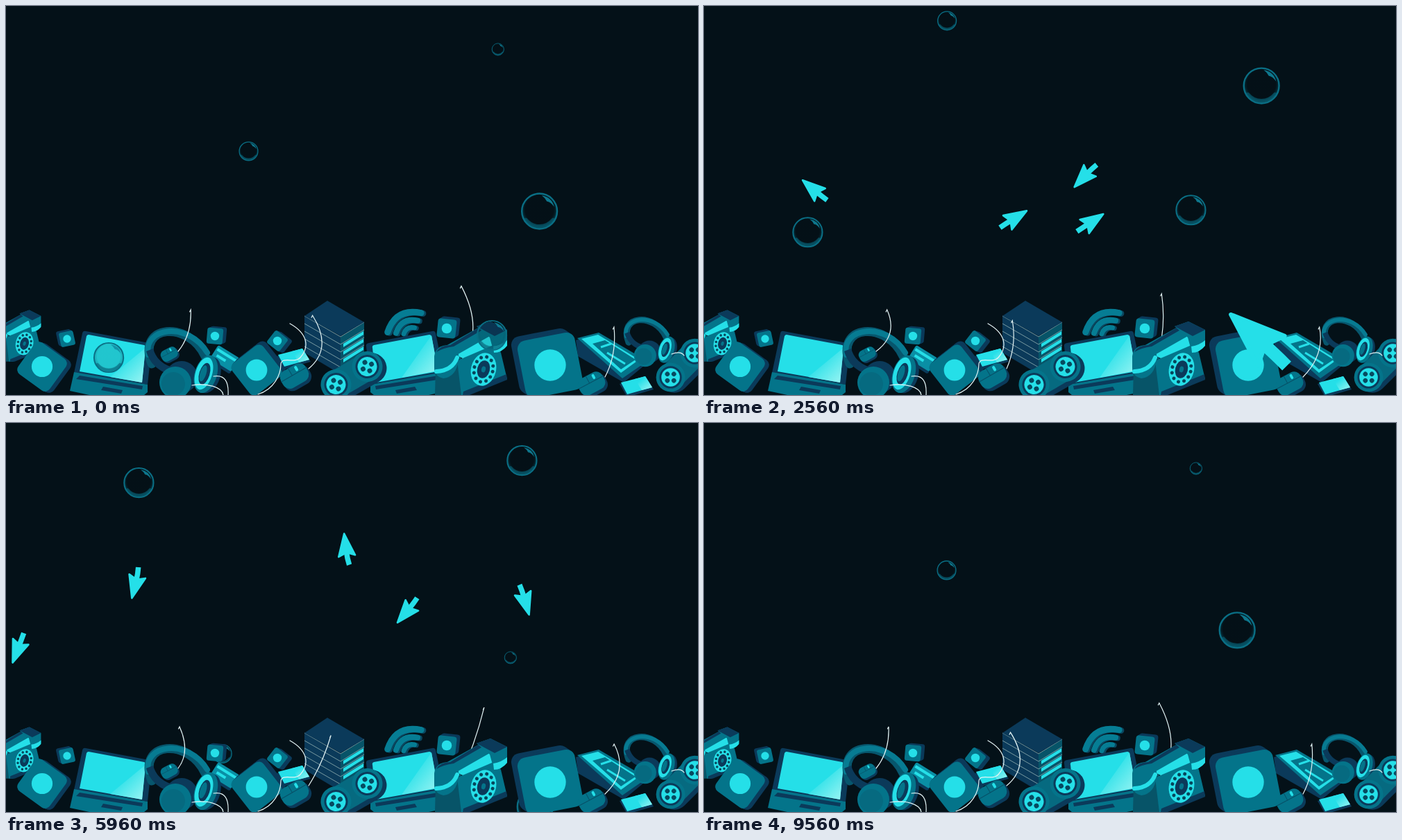
An HTML page for the animation above (9600 ms loop, 997 by 561 pixels).

```html
<!DOCTYPE html>
<html lang="en">
<head>
<meta charset="utf-8">
<title>Sea of devices</title>
<style>
html, body { margin: 0; width: 100%; height: 100%; overflow: hidden; background: #041118; }
svg { display: block; width: 100%; height: 100%; }
.n { fill: #0b3a5a; }
.t { fill: #04748a; }
.k { fill: #075468; }
.m { fill: #0a8fa5; }
.c { fill: #25dfe8; }
.line { fill: none; stroke-linecap: round; }
.wire { fill: none; stroke: #e4f4f5; stroke-width: 1.2; stroke-linecap: round; }
</style>
</head>
<body>
<svg viewBox="0 0 997 561">
<defs>
  <linearGradient id="glow" x1="0" y1="0" x2="1" y2="1">
    <stop offset=".3" stop-color="#25dfe8"/><stop offset="1" stop-color="#9df5f3"/>
  </linearGradient>
  <radialGradient id="film" cx=".5" cy=".45" r=".55">
    <stop offset=".72" stop-color="#020a10" stop-opacity=".12"/>
    <stop offset=".86" stop-color="#08596c" stop-opacity=".35"/>
    <stop offset="1" stop-color="#0b7a90" stop-opacity=".95"/>
  </radialGradient>
  <g id="bubble">
    <circle r="48" fill="url(#film)" stroke="#0a6f85" stroke-width="4.5"/>
    <path d="M6 -43Q34 -38 40 -12Q30 -26 20 -27Q16 -36 6 -43Z" fill="#108aa2" opacity=".85"/>
    <path d="M-37 22Q-22 40 0 40T37 22" class="line" stroke="#08647a" stroke-width="8" opacity=".6"/>
  </g>
  <g id="laptop">
    <path class="n" d="M115 469L206 486Q211 487 210 491L204 546L98 529L110 472Q111 468 115 469Z"/>
    <path class="c" d="M119 474L199 489Q202 490 201 493L196 543L106 527L116 476Q117 474 119 474Z"/>
    <path class="t" d="M98 528L204 546V557L199 561H120L92 555Z"/>
    <path class="n" d="M106 533L197 548L196 553L101 538Z"/>
    <path class="n" d="M140 549L168 554L166 559L137 554Z"/>
  </g>
  <g id="phone">
    <path class="k" d="M619 520L655 503L666 561H618Z"/>
    <path class="t" d="M650 512L704 484L713 500L722 538L664 561H656Z"/>
    <path class="n" d="M659 556L721 531L722 539L668 561H658Z"/>
    <path class="c" d="M646 502L700 474L707 487L658 508Z"/>
    <path class="t" d="M632 491L684 462L704 472L648 504Z"/>
    <path class="t" d="M617 505Q619 489 638 489Q654 491 652 510Q649 535 630 537Q617 534 617 522Z"/>
    <path class="n" d="M620 499Q626 489 640 489L684 462L690 465L645 491Q630 493 620 499Z"/>
    <path class="line" d="M620 527Q643 526 650 507" stroke="#25dfe8" stroke-width="6"/>
    <path class="t" d="M678 462L698 455L722 467V488L703 500L697 478Z"/>
    <path class="n" d="M678 462L698 455L722 467L704 476Z"/>
    <path class="c" d="M702 491Q714 489 722 482V490Q714 500 703 500Z"/>
    <g transform="translate(688 524) rotate(14)">
      <ellipse rx="18" ry="24" class="c"/>
      <ellipse rx="13.5" ry="18.5" class="line" stroke="#06465c" stroke-width="5" stroke-dasharray="0 8.4"/>
      <ellipse rx="9" ry="13" class="n"/>
      <ellipse rx="3" ry="4.5" class="t"/>
    </g>
  </g>
  <g id="headset">
    <path class="line" d="M210 516C188 458 264 454 287 505" stroke="#07566d" stroke-width="13"/>
    <path class="line" d="M205 503C197 463 262 454 290 500" stroke="#077b92" stroke-width="8"/>
    <path class="n" d="M202 498L212 494Q218 515 240 521L231 530Q208 520 202 498Z"/>
    <circle class="n" cx="253" cy="535" r="23"/>
    <circle class="t" cx="244" cy="543" r="23"/>
    <circle cx="241" cy="545" r="17" fill="#066a80"/>
    <g transform="translate(285 530) rotate(17)">
      <ellipse class="n" cx="7" rx="17" ry="27"/>
      <ellipse class="t" cx="3" rx="16" ry="28"/>
      <ellipse class="c" rx="12" ry="24"/>
      <ellipse class="n" cx="1" rx="7.5" ry="16"/>
      <ellipse class="t" cx="-1" rx="4.5" ry="12"/>
    </g>
  </g>
  <g id="mouse">
    <rect class="n" x="-20" y="-12" width="42" height="29" rx="12"/>
    <rect class="t" x="-21" y="-16" width="41" height="28" rx="11"/>
    <path d="M-3 -16V-4M-21 -4H20" class="line" stroke="#075067"/>
    <rect class="c" x="5" y="-14" width="4" height="8" rx="2"/>
  </g>
  <g id="knob">
    <circle class="t" r="22"/>
    <circle class="n" r="17"/>
    <circle class="c" r="14"/>
    <path d="M0 -7V-7M7 0H7M0 7V7M-7 0H-7" class="line" stroke="#064a60" stroke-width="7"/>
  </g>
  <g id="gamepad">
    <path class="line" d="M-23 5H30" stroke="#0b3a5a" stroke-width="44"/>
    <path class="line" d="M-26 0H26" stroke="#066a80" stroke-width="40"/>
    <use href="#knob" x="-26"/><use href="#knob" x="26"/>
  </g>
  <g id="slate">
    <path class="n" d="M-24 -3L14 -13L25 5L-13 16Z"/>
    <path class="c" d="M-22 -5L13 -14L23 2L-13 12Z"/>
    <path d="M-2 -10L13 -14L23 2L8 6Z" fill="url(#glow)"/>
  </g>
</defs>
<g id="far"></g>
<g id="back"></g>
<g id="front"></g>
<g id="near"></g>
</svg>
<script>
const LOOP = 9600, NS = 'http://www.w3.org/2000/svg';
const $ = id => document.getElementById(id);

function add(parent, tag, attrs = {}) {
  const el = document.createElementNS(NS, tag);
  for (const k in attrs) el.setAttribute(k, attrs[k]);
  return parent.appendChild(el);
}
const use = (id, transform = '') => `<use href="#${id}" transform="${transform}"/>`;
const poly = (cls, pts) => `<polygon class="${cls}" points="${pts}"/>`;

// App tile: extruded rounded square with a plain disc
function tile(x, y, size, turn, dx, dy) {
  const face = (cls, k) => `<rect class="${cls}" x="${-size / 2}" y="${-size / 2}" width="${size}" height="${size}"
    rx="${size * .15}" transform="translate(${x + dx * k} ${y + dy * k}) rotate(${turn})"/>`;
  return [1, .75, .5, .25].map(k => face('n', k)).join('') + face('t', 0) +
    `<circle class="c" cx="${x}" cy="${y}" r="${size * .27}"/>`;
}

function server() {
  let s = poly('n', '430,447 482,477 482,531 430,500') + poly('k', '482,477 516,456 516,512 482,531');
  for (let y = 0; y < 50; y += 11) {
    if (y) s += poly('c', `486,${476 + y} 515,${458 + y} 515,${463 + y} 486,${481 + y}`);
    s += `<path d="M430 ${447 + y}L482 ${477 + y}L516 ${456 + y}" fill="none" stroke="#7799a0"/>`;
  }
  return s + poly('n', '463,425 516,456 482,476 430,447');
}

function wifi() {
  const arc = (r, color, shift) => `<path class="line" stroke="${color}" stroke-width="${6 + r / 10}"
    d="M${-r * .9} ${-r * .65}Q0 ${-r * 1.45} ${r * .9} ${-r * .65}" transform="translate(${shift} ${shift})"/>`;
  const arcs = [10, 20, 31].map(r => arc(r, '#0a4760', 2) + arc(r, '#067d94', 0));
  return `<g transform="translate(584 474) rotate(-30)">${arcs.join('')}</g>`;
}

const card = `<g transform="translate(314 508) rotate(32)"><rect class="n" x="-17" y="-9" width="36" height="24" rx="3"/>
  <rect class="m" x="-17" y="-12" width="36" height="23" rx="3"/><path d="M-15 -6H17M-11 2H4" stroke="#25dfe8" stroke-width="4"/></g>`;

const tablet = poly('n', '821,482 853,472 925,514 890,543 824,505') +
  poly('t', '823,479 854,471 924,512 888,537') + poly('c', '829,480 853,474 912,510 886,529') +
  poly('t', '845,487 863,482 907,510 886,524') +
  '<path d="M857 492L872 487M866 500L892 516" stroke="#25dfe8" stroke-width="3"/>';

const wire = (id, scale = 1) => add($(id), 'path', { class: 'wire', 'stroke-width': scale });

$('back').innerHTML = server() + wifi();
const phoneWire = wire('back');
$('front').innerHTML =
  use('phone', 'translate(-455 120) scale(.7)') +
  tile(52, 520, 56, 36, 6, 2) + tile(88, 480, 21, -12, -4, -2) +
  use('laptop') + '<path d="M201 493L196 543L150 535Z" fill="url(#glow)"/>' +
  card + use('headset') + use('mouse', 'translate(236 503) rotate(-28) scale(.6)') +
  tile(301, 476, 23, 5, 5, -2) + tile(361, 525, 57, -38, 5, -5) + tile(391, 483, 23, 38, 6, 2) +
  use('slate', 'translate(414 508)') + use('mouse', 'translate(417 535) rotate(-30)') +
  use('laptop', 'translate(729 0) scale(-1 1)') +
  '<path d="M613 475L622 526L570 536Z" fill="url(#glow)"/>' +
  use('gamepad', 'translate(498 533) rotate(-30)') +
  tile(635, 465, 27, 6, 5, -3) + tablet + use('phone') + tile(784, 518, 84, -11, -9, -6) +
  use('mouse', 'translate(845 546) rotate(-28) scale(.95)') +
  use('headset', 'translate(750 124) scale(.7)') + use('slate', 'translate(908 548)') +
  use('gamepad', 'translate(975 518) rotate(-45) scale(.95)') +
  `<path class="wire" d="M409 458C434 472 438 491 424 507C416 516 398 505 396 516C396 532 386 553 363 560"/>
   <path class="wire" d="M268 547C290 543 312 550 313 561M299 534C316 531 321 543 320 561"/>
   <path class="wire" d="M959 502Q972 497 977 504"/>`;

const leftWire = wire('front'), midWire = wire('front'), rightWire = wire('front');

// Cosine that peaks at a given time, with whole cycles per loop
const wave = (t, peak, cycles = 1) => Math.cos((t - peak) / LOOP * cycles * 2 * Math.PI);

function bow(el, tip, tipY, mid, midY, root, rootY) {
  const cx = 2 * mid - (tip + root) / 2, cy = 2 * midY - (tipY + rootY) / 2;
  el.setAttribute('d', `M${tip - 1.5} ${tipY + 3}L${tip} ${tipY}Q${cx} ${cy} ${root} ${rootY}`);
}

function drawWires(t) {
  bow(leftWire, 259 + 9 * wave(t, 1000), 438, 262 + 6 * wave(t, 2300), 471, 248, 498);
  bow(rightWire, 879 + 8 * wave(t, 3000), 463, 881 + 7 * wave(t, 4100), 501, 863, 535);
  const tip = 451 + 11 * wave(t, 6200) + 7 * wave(t, 1500, 2), tipY = 450 - 5 * wave(t, 8500);
  const mid = 452 + 7 * wave(t, 7900);
  bow(midWire, tip, tipY, mid, 489, 436, 523);
  // The big phone's cord is an enlarged copy of the middle one
  const X = x => 649 + 1.24 * (x - 436), Y = y => 402 + 1.5 * (y - 445);
  bow(phoneWire, X(tip), Y(tipY), X(mid), Y(489), X(436), Y(523));
}

// All bubbles rise steadily along one wavy path, each shifted along it
const sway = y => -.09 * y - 10.3 * Math.sin((y - 185) / 80);
const bubble = (r, x, y, speed, shift, bend = 1, loops = true) =>
  ({ r, x, y, speed, shift, bend, loops, el: add($(loops ? 'far' : 'near'), 'use', { href: '#bubble' }) });
const bubbles = [
  bubble(26.5, 800, 296, .0707, 38),
  bubble(14, 342, 209.5, .0735, 225),
  bubble(9, 711, 62.5, .0758, 10, -.4),
  bubble(22, 738, 475, .0706, 0, 1, false),
  bubble(22, 186, 507, .0706, 32, 1, false)
];

function drawBubbles(t) {
  for (const { el, r, x, y, speed, shift, bend, loops } of bubbles) {
    let h = y - speed * t;
    if (loops && h < -30) h += speed * LOOP;
    el.setAttribute('transform', `translate(${x + bend * sway(h - shift)} ${h}) scale(${r / 50})`);
  }
}

// Each pointer passes four stops (tip x, tip y, heading) between a rise and a dive
const STOPS = [1600, 3520, 4920, 5960];
function pointer(enter, size, ...stops) {
  const [x, y] = stops[0], [ex, , ea] = stops[3];
  const keys = [[x + (x - 440) * .2, 640, 270], ...stops, [ex + 60 * Math.cos(ea * Math.PI / 180), 630, 90]];
  const el = add($('near'), 'g');
  add(el, 'path', { d: 'M0 1.5L12 34L0 29L-12 34Z', fill: '#25dfe8', stroke: '#25dfe8', 'stroke-width': 2.6, 'stroke-linejoin': 'round' });
  const tail = add(el, 'path', { fill: 'none', stroke: '#25dfe8', 'stroke-width': 7.5 });
  return { el, tail, keys, size, times: [enter, ...STOPS, 7050] };
}
const pointers = [
  pointer(500, 1, [199, 276, 185], [95, 201, 229], [71, 184, 285], [9, 347, 111]),
  pointer(500, 1, [593, 241, 231], [518, 319, 25], [201, 212, 224], [181, 254, 104]),
  pointer(900, 1, [384, 394, 281], [583, 212, 311], [519, 222, 253], [487, 158, 263]),
  pointer(900, 1, [500, 393, 267], [642, 207, 257], [695, 215, 294], [754, 278, 74]),
  pointer(900, 2.4, [803, 516, 259], [688, 380, 230], [607, 269, 196], [563, 289, 130])
];

// Curve that leaves and reaches each stop along its heading
function steer({ keys, times }, t) {
  const i = Math.max(0, times.findLastIndex(k => k <= t && k < times[5]));
  const [x0, y0, a0] = keys[i], [x1, y1, a1] = keys[i + 1], rad = Math.PI / 180;
  const u = Math.max(0, (t - times[i]) / (times[i + 1] - times[i])), v = 1 - u;
  const pull = Math.max(110, Math.hypot(x1 - x0, y1 - y0) * 1.1);
  const axis = (p, q, m, n) => [
    v * v * (1 + 2 * u) * p + u * u * (3 - 2 * u) * q + pull * (u * v * v * m - u * u * v * n),
    6 * u * v * (q - p) + pull * (v * (1 - 3 * u) * m + u * (3 * u - 2) * n)
  ];
  const [x, dx] = axis(x0, x1, Math.cos(a0 * rad), Math.cos(a1 * rad));
  const [y, dy] = axis(y0, y1, Math.sin(a0 * rad), Math.sin(a1 * rad));
  return { x, y, angle: Math.atan2(dy, dx) / rad };
}

function drawPointers(t) {
  for (const p of pointers) {
    const live = t >= p.times[0] && t <= p.times[5];
    p.el.style.display = live ? '' : 'none';
    if (!live) continue;
    const { x, y, angle } = steer(p, t);
    const turn = (angle - steer(p, t - 120).angle + 540) % 360 - 180;
    const bend = Math.max(-6, Math.min(6, turn * .25));
    // Large ones shrink to normal size between the second and third stop
    const far = Math.max(0, Math.min(1, (t - STOPS[1]) / (STOPS[2] - STOPS[1])));
    const scale = p.size + (1 - p.size) * far;
    p.el.setAttribute('transform', `translate(${x} ${y}) rotate(${angle + 90}) scale(${scale})`);
    p.tail.setAttribute('d', `M0 27Q0 38 ${bend} 47`);
  }
}

const start = performance.now();
function tick() {
  const t = Math.floor((performance.now() - start) % LOOP / 40) * 40;
  drawWires(t);
  drawBubbles(t);
  drawPointers(t);
  requestAnimationFrame(tick);
}
tick();
</script>
</body>
</html>
```
